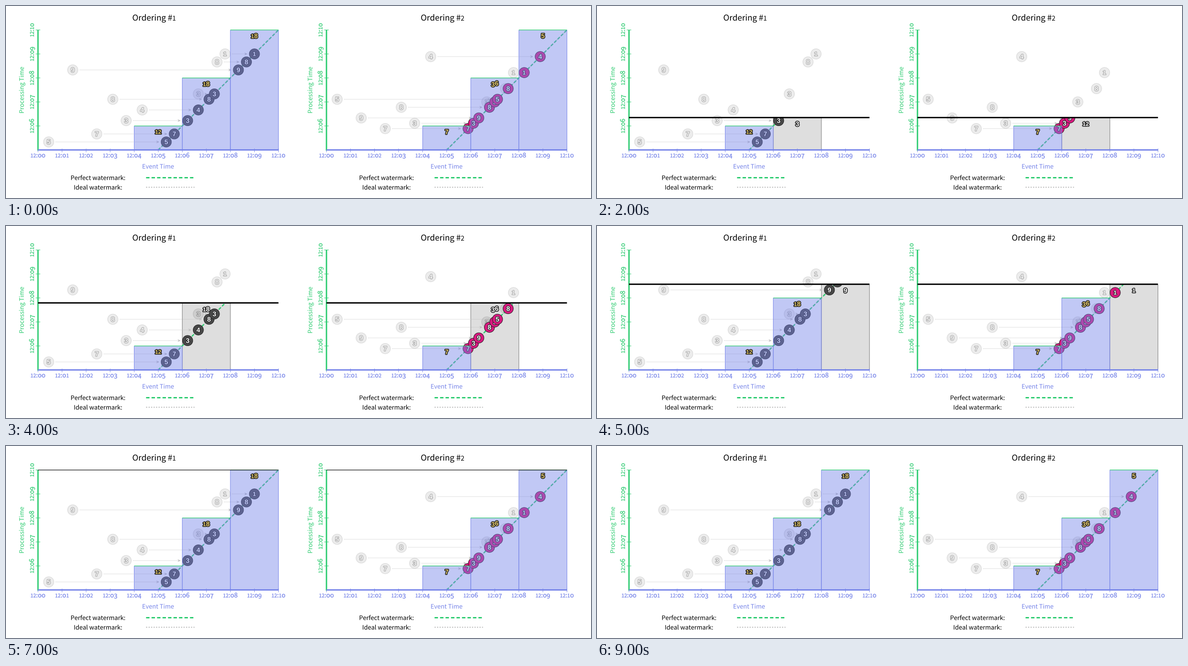
Animation, 1280 px wide and 421 px high, one loop 10000 ms. Source, as a matplotlib script:

```python
import itertools

import matplotlib.pyplot as plt
from matplotlib.animation import FuncAnimation
from matplotlib.patches import PathPatch, Rectangle
from matplotlib.path import Path
from matplotlib.textpath import TextPath
from matplotlib.transforms import Affine2D, Bbox, TransformedBbox

W, H, DPI = 1280, 421, 100
PX = 72 / DPI
INTERVAL, FRAMES, HOLD = 50, 200, 3
MINUTE = 52.62
TOP, BOTTOM = 52.5, 315.6
LAST = 45  # ninths of a minute from 12:05 to 12:10

GREEN, BLUE = "#2ecc71", "#7785e9"
DARK, GOLD = "#222222", "#e8cc6c"
TEXT_FONT = {"family": "Noto Sans CJK JP"}
NUMBER_FONT = {"family": "Liberation Sans", "weight": "bold"}
DOTS, DASHES = (0, (1, 1.1)), (0, (2.5, 1.5))

# (value, event time after 12:00, arrival after 12:05), in ninths of a minute
ORDERINGS = [
    ("Ordering #1", 70, "#484848",
     [(5, 4, 3), (7, 22, 6), (3, 33, 11), (4, 39, 15), (8, 28, 19),
      (3, 60, 21), (9, 13, 30), (8, 67, 33), (1, 70, 36)]),
    ("Ordering #2", 701.2, "#d8197f",
     [(7, 22, 8), (3, 33, 10), (9, 13, 12), (8, 28, 16), (3, 60, 18),
      (5, 4, 19), (8, 67, 23), (1, 70, 29), (4, 39, 35)]),
]

fig = plt.figure(figsize=(W / DPI, H / DPI), dpi=DPI, facecolor="white")
ax = fig.add_axes([0, 0, 1, 1])
ax.set(xlim=(0, W), ylim=(H, 0))
ax.axis("off")

reveal = Bbox.from_extents(0, BOTTOM + 1, W, TOP)
reveal_box = TransformedBbox(reveal, ax.transData)
plot_box = TransformedBbox(Bbox.from_extents(0, BOTTOM + 1.5, W, TOP - 0.5),
                           ax.transData)


def height(ninths):
    return BOTTOM - ninths * MINUTE / 9


def glyphs(text, size, font):
    return TextPath((0, 0), text, size=size, prop=font)


def text_path(text, size, font=TEXT_FONT, small=0.8):
    """Lay out text with old-style figures."""
    parts, x = [], 0
    for figure, run in itertools.groupby(
            text, key=lambda c: c if c.isdigit() else ""):
        run = "".join(run).replace("0", "o")
        scale = small if figure and figure in "12" else 1
        drop = 0.16 * size if figure and figure in "34579" else 0
        part = glyphs(run, size * scale, font)
        parts.append(part.transformed(Affine2D().translate(x, -drop)))
        bar = glyphs("|", size * scale, font).vertices[:, 0].max()
        x += glyphs(run + "|", size * scale, font).vertices[:, 0].max() - bar
    return Path.make_compound_path(*parts)


def place(path, x, y, angle=0, middle=False):
    box = path.get_extents()
    dy = (box.y0 + box.y1) / 2 if middle else 0
    return path.transformed(Affine2D().translate(-(box.x0 + box.x1) / 2, -dy)
                            .scale(1, -1).rotate_deg(angle).translate(x, y))


def number(value, x, y):
    path = text_path(str(value), 14.5, NUMBER_FONT, small=0.87)
    return place(path, x, y, middle=True)


def disc(x, y, r=11.3):
    return Path.unit_circle().transformed(Affine2D().scale(r).translate(x, y))


def add(paths, z, fill="none", edge="none", width=0, dash="-", clip=None):
    if not isinstance(paths, Path):
        paths = Path.make_compound_path(*paths)
    patch = PathPatch(paths, facecolor=fill, edgecolor=edge, lw=width * PX,
                      ls=dash, joinstyle="round", snap=False, zorder=z)
    ax.add_patch(patch)
    if clip is not None:
        patch.set_clip_box(clip)
    return patch


def segment(x0, y0, x1, y1):
    return Path([(x0, y0), (x1, y1)])


def outlined(paths, z, fill, edge, width, clip=None):
    return (add(paths, z, edge=edge, width=width, clip=clip),
            add(paths, z, fill=fill, clip=clip))


class Window:
    """A two-minute window that fills, then closes."""

    def __init__(self, left, index, items):
        self.start, self.end = 18 * index - 9, 18 * index + 9
        self.items = [(v, t) for v, _, t in items if self.start <= t < self.end]
        self.x = left + (4 + 2 * index) * MINUTE
        self.width = 2 * MINUTE
        self.fill = ax.add_patch(Rectangle((self.x, TOP), self.width, 0, lw=0,
                                           snap=False))
        self.sides = add(segment(0, 0, 1, 1), 4, edge=BLUE, width=1)
        right = self.x + self.width
        y = height(self.end)
        self.cap = add(segment(self.x, y, right, y), 4.1, edge=GREEN, width=1.3)
        self.label = outlined(segment(0, 0, 1, 1), 5, "white", DARK, 3.4)

    def update(self, now):
        total = sum(v for v, t in self.items if t <= now)
        closed = now >= self.end
        for artist in (self.fill, self.sides, *self.label):
            artist.set_visible(total > 0)
        self.cap.set_visible(closed)
        if not total:
            return
        y = height(min(now, self.end))
        right = self.x + self.width
        self.fill.set_y(y)
        self.fill.set_height(BOTTOM - y)
        self.fill.set_facecolor(BLUE if closed else "black")
        self.fill.set_alpha(0.45 if closed else 0.13)
        self.fill.set_zorder(4 if closed else 2)
        self.sides.set_path(Path.make_compound_path(
            segment(self.x, BOTTOM, self.x, y),
            segment(right, BOTTOM, right, y)))
        self.sides.set_edgecolor(BLUE if closed else "#777777")
        self.sides.set_zorder(4 if closed else 2)
        path = number(total, self.x + self.width / 2, y + 13)
        for patch in self.label:
            patch.set_path(path)
        self.label[1].set_facecolor(GOLD if closed else "white")


def draw_axes(left, title):
    right = left + 10 * MINUTE
    middle = (left + right) / 2
    add(place(text_path(title, 17.8), middle - 9, 32), 6, fill="black")

    x_labels, x_ticks, y_labels, y_ticks = [], [], [], []
    for i in range(11):
        x = left + i * MINUTE
        x_labels.append(place(text_path(f"12:{i:02d}", 13.8), x, 332))
        x_ticks.append(segment(x, BOTTOM - 3, x, BOTTOM + 5))
    for i in range(1, 6):
        y = height(9 * i)
        y_labels.append(place(text_path(f"12:{i + 5:02d}", 13.8),
                              left - 9, y, -90))
        y_ticks.append(segment(left - 5, y, left + 5, y))

    names = (place(text_path("Event Time", 13.4), middle, 356.5),
             place(text_path("Processing Time", 13.4), left - 31, 184, -90))
    for name, labels, ticks, color in zip(names, (x_labels, y_labels),
                                          (x_ticks, y_ticks), (BLUE, GREEN)):
        add(name, 6, fill=color)
        add(labels, 6, fill=color, edge=color, width=0.3)
        add(ticks, 6, edge=color, width=1)
    add(segment(left, TOP, left, BOTTOM + 1.5), 6, edge=GREEN, width=3)
    add(segment(left, BOTTOM, right, BOTTOM), 6, edge=BLUE, width=3)


def draw_watermarks(left):
    add([place(text_path("Perfect watermark:", 13.4), left + 131.5, 381.5),
         place(text_path("Ideal watermark:", 13.4), left + 131.5, 402.5)],
        6, fill="black")
    x0, x1 = left + 236.5, left + 342.5
    add(segment(x0, 376.5, x1, 376.5), 6, edge=GREEN, width=3, dash=DASHES)
    add(segment(x0, 397.5, x1, 397.5), 6, edge="#c8c8c8", width=2.6, dash=DOTS)
    diagonal = segment(left + 5 * MINUTE, BOTTOM, left + 10 * MINUTE, TOP)
    add(diagonal, 3, edge="#c8c8c8", width=2, dash=DOTS, clip=reveal_box)
    add(diagonal, 3, edge=GREEN, width=2.6, dash=DASHES, clip=reveal_box)


def draw_items(left, color, items):
    ghosts, ghost_digits, shafts, heads = [], [], [], []
    for value, event, arrival in items:
        x, y = left + event * MINUTE / 9, height(arrival)
        target = left + (45 + arrival) * MINUTE / 9
        ghosts.append(disc(x, y))
        ghost_digits.append(number(value, x, y))
        tip = target - 15
        if tip - x > 18:
            shafts.append(segment(x + 15.5, y, tip - 4, y))
            heads.append(Path([(tip, y), (tip - 7, y - 3), (tip - 5, y),
                               (tip - 7, y + 3), (tip, y)], closed=True))
    add(ghosts, 1, fill="#ececec", edge="#d6d6d6", width=1)
    outlined(ghost_digits, 1, "#f6f6f6", "#a6a6a6", 2.2)
    add(shafts, 2.5, edge="#bcbcbc", width=1.2, dash=(0, (1, 1.5)),
        clip=reveal_box)
    add(heads, 2.5, fill="#c0c0c0", clip=reveal_box)

    for value, _, arrival in items:
        x, y = left + (45 + arrival) * MINUTE / 9, height(arrival)
        add(disc(x, y), 3.5, fill=color, edge=DARK, width=1, clip=reveal_box)
        outlined(number(value, x, y), 3.5, "white", DARK, 2.4, clip=reveal_box)


windows, now_lines = [], []
for title, left, color, items in ORDERINGS:
    draw_axes(left, title)
    draw_watermarks(left)
    draw_items(left, color, items)
    windows += [Window(left, i, items) for i in range(3)]
    now_lines.append(add(segment(left, TOP, left + 10 * MINUTE, TOP), 7,
                         edge="black", width=3, clip=plot_box))


def update(frame):
    # The finished chart shows first, then time sweeps up in steps.
    step = frame // HOLD - 1
    running = 0 <= step <= LAST
    now = step if running else LAST
    y = height(now)
    reveal.y1 = y
    for window in windows:
        window.update(now)
    for (_, left, _, _), line in zip(ORDERINGS, now_lines):
        line.set_visible(running)
        line.set_path(segment(left, y - 0.8, left + 10 * MINUTE, y - 0.8))
    return []


animation = FuncAnimation(fig, update, frames=FRAMES, interval=INTERVAL,
                          init_func=lambda: update(0), repeat=True)
plt.show()
```
